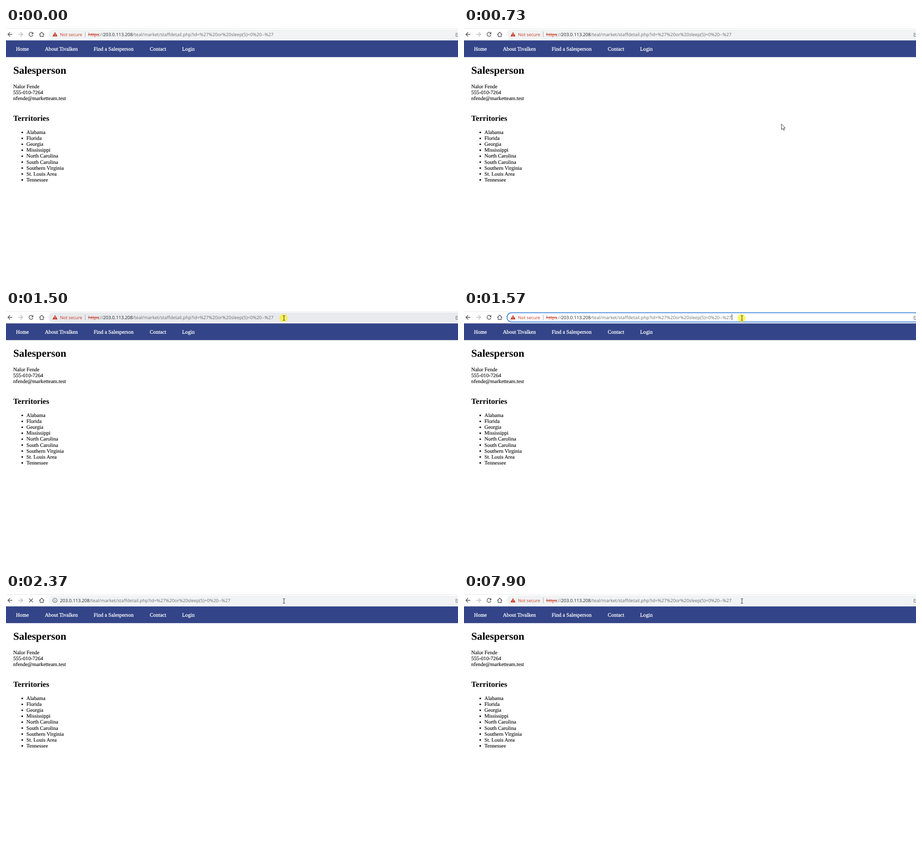
Write an HTML page with a canvas that moves like this. It is 996x563 px and loops after 8 s.

```html
<!DOCTYPE html>
<html lang="en">
<head>
<meta charset="utf-8">
<title>Salesperson</title>
<style>
  html, body { margin: 0; width: 100%; height: 100%; overflow: hidden; background: #fff; }
  canvas, svg { position: absolute; left: 0; top: 0; width: 996px; height: 563px; display: block; }
  text { white-space: pre; text-rendering: geometricPrecision; }
  .page { font: 11.62px "Liberation Serif", "Times New Roman", serif; fill: #000; stroke: #000; stroke-width: .12px; }
  .nav { fill: #fff; stroke: #fff; stroke-width: .3px; }
  .h1 { font-size: 23.14px; font-weight: bold; stroke: none; }
  .h2 { font-size: 17.35px; font-weight: bold; stroke: none; }
  .bar { font: 10px "Open Sans", "Noto Sans", sans-serif; fill: #696d72; }
  .chip { font-size: 9.7px; }
  .red { fill: #c5371f; }
  .host { fill: #202124; }
</style>
</head>
<body>
<canvas id="stage" width="996" height="563"></canvas>
<svg id="words" viewBox="0 0 996 563">
  <defs><clipPath id="cut"><rect id="cutBox" x="118" y="0" width="52" height="28"/></clipPath></defs>
</svg>
<script>
const LOOP = 8000;
const ctx = document.getElementById('stage').getContext('2d');
const svg = document.getElementById('words');
const cutBox = document.getElementById('cutBox');
const NS = 'http://www.w3.org/2000/svg';

function add(tag, attrs, parent = svg) {
  const el = document.createElementNS(NS, tag);
  for (const k in attrs) el.setAttribute(k, attrs[k]);
  parent.appendChild(el);
  return el;
}
function label(str, x, y, cls, parent) {
  add('text', { x, y, class: cls }, parent).textContent = str;
}

// Page text
const nav = [['Home', 22], ['About Tivalken', 85.7], ['Find a Salesperson', 193.3], ['Contact', 316.8], ['Login', 388]];
nav.forEach(([s, x]) => label(s, x, 50.3, 'page nav'));
label('Salesperson', 16, 100.6, 'page h1');
['Nalor Fende', '555-010-7264', 'nfende@marketteam.test']
  .forEach((s, i) => label(s, 16, 132.6 + i * 13.1, 'page'));
label('Territories', 16, 204.6, 'page h2');
const areas = ['Alabama', 'Florida', 'Georgia', 'Mississippi', 'North Carolina',
  'South Carolina', 'Southern Virginia', 'St. Louis Area', 'Tennessee'];
areas.forEach((s, i) => label(s, 45, 234 + i * 13.1, 'page'));

// Address bar text
const BASE = 17.5;
const chip = add('g', { 'clip-path': 'url(#cut)' });
label('Not secure', 119, BASE, 'bar chip red', chip);
const scheme = add('g', {});
label('https', 181, BASE, 'bar red', scheme);
label('://', 204.6, BASE, 'bar', scheme);
add('path', { d: 'M181 14.5H205', stroke: '#c5371f', 'stroke-width': 1 }, scheme);
const address = add('g', {});
const line = add('text', { x: 214, y: BASE, class: 'bar' }, address);
add('tspan', { class: 'host' }, line).textContent = '203.0.113.208';
add('tspan', {}, line).textContent = '/teal/market/staffdetail.php?id=%27%20or%20sleep(5)=0%20--%27';

// Shape helpers
function stroke(d, color, width = 1.4) {
  ctx.strokeStyle = color;
  ctx.lineWidth = width;
  ctx.stroke(new Path2D(d));
}
function fill(d, color) {
  ctx.fillStyle = color;
  ctx.fill(new Path2D(d));
}
function rect(x, y, w, h, color) {
  ctx.fillStyle = color;
  ctx.fillRect(x, y, w, h);
}
function dot(x, y, r, color) {
  ctx.fillStyle = color;
  ctx.beginPath();
  ctx.arc(x, y, r, 0, Math.PI * 2);
  ctx.fill();
}

const GREY = '#54575c';

function drawToolbar(t) {
  const hover = t >= 1290 && t < 1570;
  const focus = t >= 1570 && t < 2370;
  const busy = t >= 2370 && t < 7900;
  const plain = t >= 2370 && t < 7700;
  const shift = t >= 7700 && t < 7770 ? -11 : 0;

  rect(0, 0, 996, 1, '#e6e8eb');
  rect(0, 26.7, 996, 0.8, '#dcdee1');
  ctx.beginPath();
  if (focus) {
    ctx.roundRect(94.8, 3.7, 930, 20.5, 10.2);
    ctx.strokeStyle = '#1f70d4';
    ctx.lineWidth = 1.5;
    ctx.stroke();
  } else {
    ctx.roundRect(94, 3, 930, 22, 11);
    ctx.fillStyle = hover ? '#e8eaed' : '#f1f3f4';
    ctx.fill();
  }

  stroke('M14 14H4.5M9 9.2L4.2 14L9 18.8', GREY);
  stroke('M27 14H36.5M32 9.2L36.8 14L32 18.8', '#b9bbbe');
  if (busy) {
    stroke('M51 10L59.2 18.2M59.2 10L51 18.2', GREY);
  } else {
    stroke('M58.6 11.2A4.4 4.4 0 1 0 59.4 15.2', GREY);
    fill('M60.2 9V13.6H55.6Z', GREY);
  }
  stroke('M73.3 14.6L78.7 9.3L84.1 14.6M75.3 13.5V18.7H82.1V13.5', GREY);

  if (plain) {
    stroke('M103.2 14a4.7 4.7 0 1 0 9.4 0a4.7 4.7 0 1 0 -9.4 0', '#5f6368', 1.1);
    rect(107.4, 13.3, 1.1, 3.4, '#5f6368');
    rect(107.4, 11.2, 1.1, 1.2, '#5f6368');
  } else {
    fill('M108 9L113.6 18.6H102.4Z', '#c5301f');
    rect(107.4, 12.2, 1.2, 3.2, '#fff');
    rect(107.4, 16.2, 1.2, 1.2, '#fff');
    rect(174 + shift, 8, 1, 12, '#a3a8ae');
  }
  if (focus && t < 2120) rect(590, 7, 1, 13, '#202124');
  stroke('M994.5 11.5H991.5V18.5H997M993.5 16C993.5 13.8 995 12.8 997 12.8', '#6b6f74', 1);

  chip.style.display = scheme.style.display = plain ? 'none' : '';
  cutBox.setAttribute('width', shift ? 40 : 52);
  scheme.setAttribute('transform', `translate(${shift} 0)`);
  address.setAttribute('transform', `translate(${plain ? -95 : shift} 0)`);
}

function drawPage() {
  rect(0, 27.4, 996, 36.9, '#334488');
  areas.forEach((_, i) => dot(35.8, 230.6 + i * 13.1, 1.8, '#000'));
}

// Pointer positions, one per tick; the slack absorbs uneven ticks
const START = 460, TICK = 69, SLACK = 8;
const trail = [[943, 541], [882, 456], [815, 364], [748, 276], [699.5, 212], [662, 166],
  [630, 128], [604, 97], [585, 71], [574, 51], [571, 37], [585, 25], [601, 17], [610, 16], [612.5, 15.5]];

function drawPointer(t) {
  if (t < START) return;
  const i = Math.min(trail.length - 1, Math.floor((t - START + SLACK) / TICK));
  const [x, y] = trail[i];
  if (t >= 1500 && t < 1640) dot(611.5, 15.5, 9, 'rgba(255,238,0,.6)');
  ctx.save();
  ctx.translate(x, y);
  if (t < 1290) {
    const arrow = 'M0 0V12.3L2.9 9.7L4.8 14L6.8 13.1L4.9 8.9H8.6Z';
    fill(arrow, '#fff');
    stroke(arrow, '#222', 0.9);
  } else {
    stroke('M0 -5V5M-2.5 -5H-.6M.6 -5H2.5M-2.5 5H-.6M.6 5H2.5', '#222', 1);
  }
  ctx.restore();
}

const begin = performance.now();
function draw() {
  const t = Math.max(0, performance.now() - begin) % LOOP;
  rect(0, 0, 996, 563, '#fff');
  drawToolbar(t);
  drawPage();
  drawPointer(t);
  requestAnimationFrame(draw);
}
draw();
</script>
</body>
</html>
```
